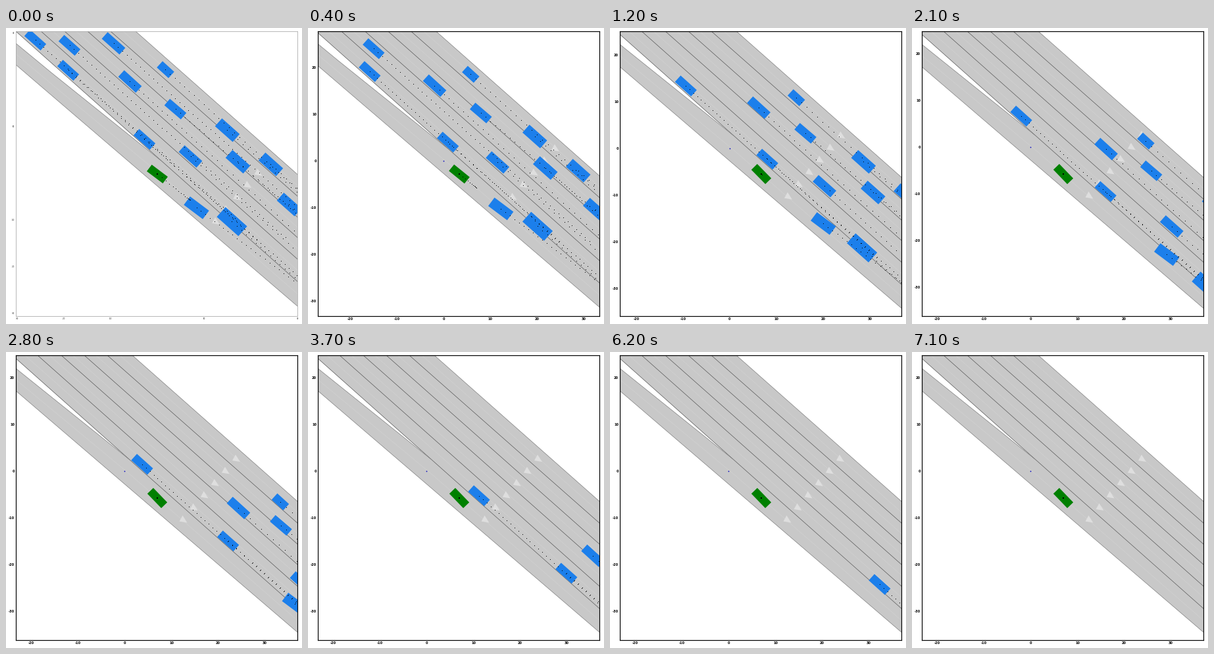
Animation of 450x450 px, one loop 8000 ms. Source, as a matplotlib script:

```python
import numpy as np
import matplotlib.pyplot as plt
from matplotlib.animation import FuncAnimation
from matplotlib.patches import Polygon

SIZE, DPI = 450, 100
FRAMES, STEP = 80, 100
PX = 72 / DPI                         # one pixel in points
LEFT, RIGHT, TOP, BOTTOM = 15.2, 443, 4.8, 438
ORIGIN = np.array([180.5, 181.5])     # map origin, in pixels of the final view
TEN_M = 71
EGO_END = np.array([230, 222])
EGO_TRAVEL = np.array([49.5, 39.3])
STOP_TIME = 1.45
HORIZON = np.arange(0, 5, 0.1)        # seconds of predicted path
ROAD, BLUE, GREEN = "#c8c8c8", "#1c7feb", "#008000"

plt.rcParams["font.family"] = "DejaVu Sans"
fig = plt.figure(figsize=(SIZE / DPI, SIZE / DPI), dpi=DPI, facecolor="white")
ax = fig.add_axes([LEFT / SIZE, 1 - BOTTOM / SIZE,
                   (RIGHT - LEFT) / SIZE, (BOTTOM - TOP) / SIZE])


# ---- road ----
xs = np.linspace(-60, 460, 261)


def straight(x0, y0, y1):
    """Line through (x0, y0) that leaves the final view at height y1."""
    return y0 + (xs - x0) * (y1 - y0) / (RIGHT - x0)


def bent(*pts):
    px, py = zip(*pts)
    return np.interp(xs, px, py)


def draw_line(ys, color, z):
    ax.plot(xs, ys, color=color, lw=0.7 * PX, zorder=z)


lanes = [straight(x, 5, y) for x, y in
         ((192, 227), (154, 260), (119, 292), (84, 323), (48, 356))]
lanes.append(bent((-60, -57), (187, 163), (460, 405)))
ramp_top = bent((-60, -37), (15, 25), (187, 163), (460, 405))
ramp_low = straight(15, 59, 426)

for top, low in ((lanes[0], lanes[-1]), (ramp_top, ramp_low)):
    ax.fill_between(xs, top, low, color=ROAD, lw=0, zorder=1)
for top, low in [*zip(lanes, lanes[1:]), (ramp_top, ramp_low)]:
    draw_line((top + low) / 2, "#d1d1d1", 2)
for ys in lanes[1:]:
    draw_line(ys, "#585858", 3)
for ys in (lanes[0], ramp_low, np.where(xs < 187, ramp_top, np.nan)):
    draw_line(ys, "#808080", 3)

# one give-way marker per lane, in a slanted row
for center in np.linspace((350, 162), (269.5, 254.5), 6):
    corners = center + [(-1, -6), (-6, 3), (6, 5)]
    ax.add_patch(Polygon(corners, fc="#dedede", lw=0, zorder=4))

ax.plot(*ORIGIN, "o", color="#1010c0", ms=1.8 * PX, mew=0, zorder=4, snap=False)


# ---- vehicles ----
SMALL, SEDAN, LONG, VAN, TRUCK = (24, 13), (33, 13), (36, 13.5), (36, 16), (44, 20)


def box(center, size, angle):
    along = np.array([np.cos(angle), np.sin(angle)]) * size[0] / 2
    across = np.array([-np.sin(angle), np.cos(angle)]) * size[1] / 2
    return np.array([center + s * along + r * across
                     for s, r in ((-1, -1), (1, -1), (1, 1), (-1, 1))])


class Car:
    """Drives a straight path with steady acceleration (pixels and seconds)."""

    def __init__(self, size, x, y, speed, accel=0, slope=0.89, until=8):
        self.size, self.start = size, np.array([x, y])
        self.speed, self.accel = speed, accel
        self.slope, self.until = slope, until
        self.patch = ax.add_patch(Polygon(np.zeros((4, 2)), fc=BLUE, lw=0, zorder=5))

    def path(self, t):
        run = self.speed * t + self.accel * t ** 2 / 2
        return self.start + np.outer(run, (1, self.slope))

    def update(self, t):
        self.patch.set_visible(t < self.until)
        path = self.path(t + HORIZON)
        self.patch.set_xy(box(path[0], self.size, np.arctan(self.slope)))
        return path if t < self.until else path[:0]


cars = [
    Car(SEDAN, -5, -21, 62, until=0.25),
    Car(SEDAN, 47, -13, 67, until=0.75),
    Car(LONG, 114, -16, 67, until=0.25),
    Car(SEDAN, 45, 25, 57, 0.6, slope=0.9),
    Car(LONG, 139, 42, 67.5, 6.5, slope=0.91),
    Car(SMALL, 193, 24, 69.5, 7.5, slope=0.91),
    Car(SEDAN, 208, 84, 71.5, 2.5, slope=0.855),
    Car(VAN, 287, 116, 79, 3),
    Car(SEDAN, 161, 130, 64.5, -1),
    Car(LONG, 231, 156, 78),
    Car(VAN, 303, 164, 79.5),
    Car(VAN, 353, 168, 79.5),
    Car(VAN, 381, 229, 74.5),
    Car(VAN, 240, 234, 67.5, 2.5, slope=0.75),
    Car(TRUCK, 294, 255, 72.5, 1),
]
ego = ax.add_patch(Polygon(np.zeros((4, 2)), fc=GREEN, lw=0, zorder=6))
dots, = ax.plot([], [], "s", color="black", ms=PX, mew=0, zorder=7)
ego_dot, = ax.plot([], [], "s", color="black", ms=2 * PX, mew=0, zorder=7)


def remaining(t):
    """Share of the braking distance still ahead."""
    return np.clip(1 - t / STOP_TIME, 0, 1) ** 2


# ---- axes ----
marks = np.arange(-4, 5)


def style_axes(faint):
    hidden = (0, 2) if faint else ()
    names = ["" if m in hidden else str(10 * m) for m in marks]
    ax.set_xticks(ORIGIN[0] + TEN_M * marks, names)
    ax.set_yticks(ORIGIN[1] - TEN_M * marks, names)
    ax.tick_params(length=0, labelsize=(2.6 if faint else 5) * PX, pad=2.2 * PX)
    for label in ax.get_xticklabels() + ax.get_yticklabels():
        label.set_fontweight("normal" if faint else "bold")
    for spine in ax.spines.values():
        spine.set_color("#a8a8a8" if faint else "black")
        spine.set_linewidth((0.8 if faint else 1.2) * PX)
        spine.set_zorder(10)


def draw(i):
    t = i * STEP / 1000
    style_axes(i == 0)
    left = remaining(t)
    dx, dy = EGO_TRAVEL * left
    ax.set_xlim(LEFT - dx, RIGHT - dx)
    ax.set_ylim(BOTTOM - dy, TOP - dy)

    ahead = EGO_END - EGO_TRAVEL * remaining(t + HORIZON)[:, None]
    heading = np.radians(37 + 9 * (1 - left) ** 2)
    ego.set_xy(box(ahead[0], (30.5, 12.6), heading))
    ego_dot.set_data(ahead[:1].T)
    dots.set_data(np.vstack([ahead] + [car.update(t) for car in cars]).T)
    return []


anim = FuncAnimation(fig, draw, frames=FRAMES, interval=STEP,
                     repeat=True, repeat_delay=0, blit=False)
plt.show()
```
